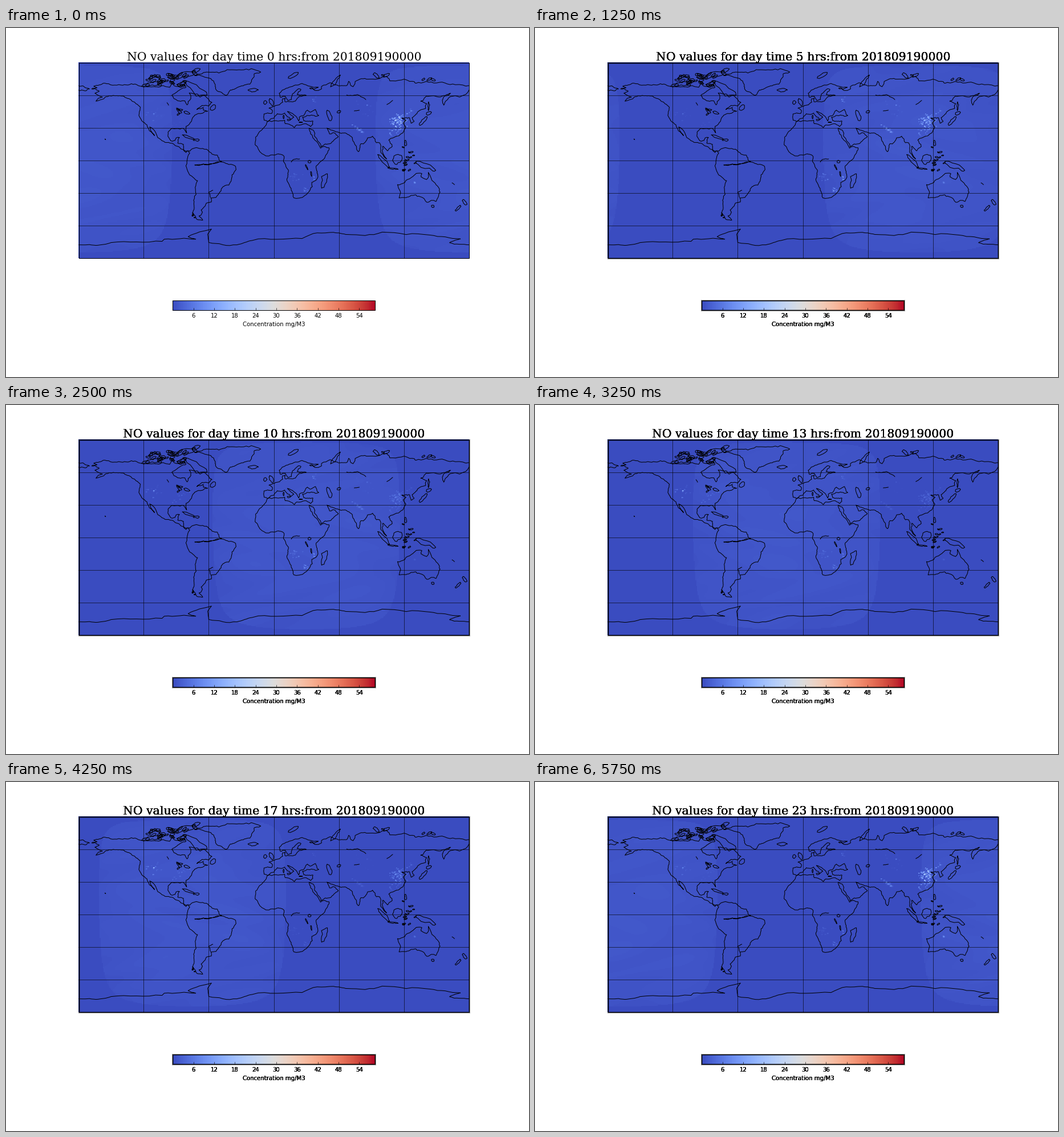
Write a matplotlib script that moves like this. It is 917x611 px and loops after 6000 ms.

```python
import numpy as np
import matplotlib.pyplot as plt
from matplotlib.animation import FuncAnimation
from matplotlib.collections import LineCollection
from matplotlib.patches import Rectangle

W, H, DPI = 917, 611, 64
PX = 72 / DPI                                # points per pixel
LEFT, RIGHT, TOP, BOTTOM = 127.25, 811.85, 61, 403.4
FRAME = (128, 812, 61, 403)
BAR = (292, 647, 477, 494)
VMAX = 58.7
FRAMES, STEP = 24, 250
rng = np.random.default_rng(7)

fig = plt.figure(figsize=(W / DPI, H / DPI), dpi=DPI, facecolor="white")
ax = fig.add_axes([0, 0, 1, 1])
ax.axis("off")


def to_px(lon, lat):
    return (LEFT + (lon + 180) * (RIGHT - LEFT) / 360,
            TOP + (90 - lat) * (BOTTOM - TOP) / 180)


# ---- coastlines: a few key points, roughened by midpoint displacement ----
lines = []


def coast(*flat, rough=0.08, levels=3):
    p = np.array(flat, float).reshape(-1, 2)
    for _ in range(levels):
        d = np.diff(p, axis=0)
        shift = rng.normal(0, rough, (len(d), 1))
        out = np.empty((2 * len(p) - 1, 2))
        out[::2] = p
        out[1::2] = p[:-1] + d / 2 + shift * np.c_[-d[:, 1], d[:, 0]]
        p = out
    lines.append(np.c_[to_px(p[:, 0], p[:, 1])])


def island(lon, lat, length, width, turn=0):
    """Ragged ellipse, its long axis turned anticlockwise from east."""
    a = np.linspace(0, 2 * np.pi, 9)
    r = rng.uniform(.8, 1.15, 9)
    r[-1] = r[0]
    x, y = r * np.cos(a) * length / 2, r * np.sin(a) * width / 2
    c, s = np.cos(np.radians(turn)), np.sin(np.radians(turn))
    coast(*np.c_[lon + c * x - s * y, lat + s * x + c * y].ravel(),
          rough=.12, levels=1)


def archipelago(n, west, east, south, north, size):
    for _ in range(n):
        length = size * rng.uniform(.5, 1.3)
        island(rng.uniform(west, east), rng.uniform(south, north),
               length, length * .4, rng.uniform(-40, 40))


# North America, clockwise from the Bering Strait
coast(-168,66, -163,67, -166,68.5, -156,71.3, -141,69.6, -128,70.5, -115,68,
      -108,68, -96,67.5, -94,71.5, -91,68.5, -86,67.5, -82,69.5, -81,67.5,
      -87,65, -94,60, -92,57, -82,55, -80,51.3, -79,54.5, -76.5,57, -78,62.3,
      -70,61, -68,58.5, -64.5,60.3, -57,53.5, -60,50.2, -71,47, -65,49,
      -65,46.5, -61,45.5, -66,43.5, -70.5,43, -74,40.5, -76,36, -81,31.5,
      -80.3,25.5, -83,29.5, -90,29.5, -95,29, -97.5,26, -97.5,22, -95,18.3,
      -91,18.6, -90,21, -87,21.3, -88.5,16, -83.3,15, -83,9.5, -77.5,8.6)
coast(-77.5,7, -79.5,9, -81,7.5, -86,11, -94,16, -105.5,20.3, -109,26,
      -114.5,31, -110,23, -115,28, -117,33, -122,37, -124.4,42, -123,49,
      -131,55, -139,59.5, -148,60, -153,59, -164,54.7, -158,58.5, -165,62,
      -161,64, -168,66)
# South America
coast(-77.5,7, -80,0, -81,-5, -76,-14, -70.3,-18.4, -71.6,-31, -73.7,-40,
      -75,-48, -71,-54, -65.5,-54.8, -69,-51, -65.8,-47.5, -67,-45.5, -64,-42.5,
      -62,-39, -57.5,-38, -58,-34.3, -53.5,-34, -48.7,-28, -48,-25.5, -41.5,-22.5,
      -39,-17, -38.5,-13, -35,-8.5, -35.5,-5, -44,-2.7, -50,0, -52,5,
      -57,6, -62,10.5, -71.5,12, -75,11, -77.5,8.6)
coast(-73,-4, -65,-3, -58,-3.3, -48,-1, -56,-2.8, -65,-3.3, -73,-4, rough=.05)
coast(-58.4,-34, -60,-29, -56,-27.3)
# Greenland
coast(-73,78.2, -58,75.5, -54,70, -52,64, -44,60, -40,65, -32,68, -22,70.4,
      -20,75, -18,80, -12,81.5, -30,83.5, -47,82, -62,81.5, -73,78.2)
# Africa
coast(32.5,30, 37,20, 43,11.5, 51,11.8, 47.5,4, 39,-5, 40.7,-15, 35,-20,
      35.5,-24, 32,-29, 26,-34, 18.5,-34.3, 14.5,-23, 12,-17, 13.5,-10,
      9,-1, 9.5,3.8, 4.5,6.2, -7.5,4.4, -13.3,9, -17.3,14.7, -16.5,22,
      -10,29.5, -6,35.8, 10,37.2, 10.5,34, 19,30.4, 22,32.7, 34,31.3)
# Atlantic Europe, Baltic, Scandinavia
coast(-5.6,36, -9,37.3, -9,43, -1.8,43.5, -1.2,46, -4.5,48.3, 1.7,50.8, 8.2,53.7,
      8.2,57, 10.5,57.5, 10.3,54.2, 20,54.8, 21.5,57.3, 23.5,59, 30,60, 21.5,60.8,
      25,65.5, 22,65.7, 17.3,61.5, 16.3,56.3, 13,55.5, 10.5,59.3, 6,58.3, 5,62,
      14,67.5, 26,71, 41,67.5, 33,66.7, 38,64.5, 44,66, 44,68.3, 60,68.7)
# Arctic coast of Asia
coast(60,68.7, 67,69, 69,73, 73,68, 75,72.8, 87,75, 104,77.7, 107,73.4,
      128,73, 131,71.2, 150,71.5, 170,70, 180,69)
coast(-180,69, -170,66, -173,64.3, -180,65)
# Asia, from the Bering Sea round to the Red Sea
coast(180,65, 178.5,62.5, 163,59, 156.7,51, 156,57.5, 163,62, 155,59.3, 143,59.3,
      135.5,54.7, 141,52.5, 140,48, 132,43.2, 127.5,39.5, 129.3,36, 126.5,34.5,
      125,39.5, 121.5,39.5, 118,39, 122,37, 119.3,35, 121.8,31, 119,25.5,
      110,21, 106,19, 109.2,13, 105,9, 100.5,13.3, 100,9, 104,1.5, 98.5,8,
      97.5,16.5, 94.5,16.5, 91,22.5, 86.5,21, 80.2,15.5, 78,8.2, 73,18,
      72.5,21, 67,25, 57,26.5, 49,30, 51.5,24.5, 56,25.5, 59.5,22, 52,15.6,
      43.5,12.8, 39,21, 35,28.5, 32.5,30)
# Mediterranean and Black Sea
coast(34,31.3, 36,36.5, 27.5,36.8, 26.5,40, 35,42, 41.5,41.5, 38.5,47, 34,44.7,
      31,46.5, 28,42, 23.5,40, 22.8,36.6, 19.5,41.5, 12.5,45.3, 18.4,40,
      16,38, 10,43.8, 3.2,43.2, 0,39, -5.6,36)
# Australia
coast(114,-22, 115.5,-34.3, 124,-33.5, 131,-31.5, 138,-34.5, 141,-38.3, 149.5,-37.6,
      153.3,-29, 150.5,-23, 146,-18.5, 142.5,-10.8, 140.8,-17.4, 135.7,-15,
      136.5,-12, 131,-12, 128,-14.8, 122,-18, 114,-22)
# Antarctica
coast(-180,-77.5, -164,-78, -150,-75.4, -103,-74.3, -101,-72.3, -72,-72.3, -79,-70,
      -57.5,-63, -61,-68, -60,-75.3, -34,-77.5, -20,-73.5, 26,-71.7, 55,-66,
      68,-68, 100,-65.8, 144,-68.5, 172,-72, 162,-75.5, 180,-77.5, rough=.03)

# centre lon, centre lat, length, width, turn
for shape in [
    (-73, 67, 24, 6, -30), (-80, 80, 27, 5, 20), (-110, 71, 16, 4, 10),   # Arctic
    (-56, 49, 6, 4, 40), (-79, 21.7, 11, 2, -20), (-71.3, 19, 6, 1.6, 0),
    (-2.4, 54, 8.5, 3.5, 115), (-8, 53.4, 4, 3, 50), (-18.8, 65, 9, 2.8, 0),
    (18, 78.5, 11, 3, 30), (57, 73.5, 13, 2.5, 50),
    (14, 37.5, 3, 1.2, 0), (9, 40.2, 3, 1.2, 90), (25, 35.3, 3, .6, 0),
    (46.7, -18.8, 14, 4.5, 68), (33, -1, 3, 2.4, 0), (30.2, -6, 5.5, .7, 115),
    (34.5, -12, 4.6, .7, 100), (51, 41.5, 11, 4, 110), (60, 45, 3.6, 2.4, 20),
    (137.5, 36.5, 12, 2.5, 45), (143, 43.5, 5, 3, 20), (142.7, 50, 8, 1.3, 90),
    (121.5, 16, 5, 2, 100), (114, 1, 10, 8, 45), (101, 0, 15, 3.5, -47),
    (110, -7.4, 9, 1.2, -8), (121, -2, 7, 1.3, 80), (140.5, -5, 22, 5, -24),
    (176, -38.5, 6.5, 3, 120), (170, -43.8, 8, 2, 45), (146.6, -42, 3, 2.5, 0),
]:
    island(*shape)

archipelago(26, -122, -80, 69, 79, 6)        # Arctic Canada
archipelago(8, -100, -72, 77, 82, 6)
archipelago(5, -91, -77, 42, 47.5, 4.5)      # Great Lakes
archipelago(10, 119, 131, -4, 13, 2.5)       # Philippines, Moluccas
archipelago(4, 116, 126, -9.5, -8.2, 3)
archipelago(3, 137, 149, 74, 75.5, 6)
archipelago(3, 94, 104, 78.3, 80, 6)
archipelago(5, -75, -72.5, -54, -47, 2)      # Patagonia
coast(-98.5,53.5, -97,50.8)
coast(-155.8,20, -155,19.3, -155.8,20)
coast(67,60.5, 77,60.8, 85,56)
coast(74,45.7, 79,46.5)
coast(104,51.6, 109.8,55.5)
coast(16,-1.5, 18,1, 24,1.5)
coast(164.2,-20.3, 166.8,-22.2)

# ---- concentration field ----
NX, NY = 480, 240
lon, lat = np.meshgrid((np.arange(NX) + .5) * 360 / NX - 180,
                       90 - (np.arange(NY) + .5) * 180 / NY)


def cluster(x, y, spread, tilt, count, peak):
    layer = np.zeros((NY, NX))
    for dx, dy, r in zip(rng.normal(0, spread, count),
                         rng.normal(0, spread, count), rng.random(count)):
        if tilt:
            dy = dy * .3 + tilt * dx
        i = int((90 - y - dy) * NY / 180)
        j = int((x + dx + 180) * NX / 360)
        v = peak * (.25 + .75 * r * r)
        layer[i, j] += v
        layer[i, j + 1] += v * .6
        layer[i + 1, j] += v * .25
    return layer, x


# lon, lat, spread, tilt, count, peak
layers = [cluster(*c) for c in [
    (114, 35.5, 3.4, 0, 65, 20),
    (111.6, 27, 3.5, 0, 16, 11),
    (79, 27.5, 4, -.75, 20, 11),
    (123, 43, 3, .6, 10, 8),
    (81, 51, 7, 0, 12, 4),
    (38, 56, 1.5, 0, 5, 8),
    (28.6, -27.5, 1.3, 0, 8, 14),
    (20.5, -14.5, 2.5, 0, 12, 7),
    (37.5, -15.5, 1, 0, 4, 9),
    (-86, 38, 4, .5, 14, 5),
    (-110, 42, 3.5, 0, 12, 7),
    (-110.8, 43, .2, 0, 2, 34),
    (129, -19.5, .8, 0, 3, 12),
]]

waves = sum(np.sin(np.radians(k * lon) + k * np.sin(np.radians(3 * lat))
                   + (-1) ** k * lat / (4 + k) + k) for k in range(2, 6))
SIN_D, COS_D = np.sin(np.radians(1.4)), np.cos(np.radians(1.4))


def strength(hour, x):
    """Emissions peak at eight in the morning, local time."""
    return .6 + .4 * np.cos(np.pi / 12 * (hour + x / 15 - 8))


def field(hour):
    turn = np.radians(lon - (180 - 15 * hour))
    height = (np.sin(np.radians(lat)) * SIN_D
              + np.cos(np.radians(lat)) * COS_D * np.cos(turn))
    sun = np.sqrt(np.clip(height, 0, 1))
    day = np.where(height > .07, .6 + .85 * sun + .08 * waves, 0)
    return .1 + day + sum(a * strength(hour, x) for a, x in layers)


# ---- figure ----
def picture(data, x0, x1, y0, y1, vmax):
    return ax.imshow(data, cmap="coolwarm", vmin=0, vmax=vmax, aspect="auto",
                     extent=(x0, x1, y1, y0), interpolation="nearest")


image = picture(field(0), LEFT, RIGHT, TOP, BOTTOM, VMAX)
picture(np.linspace(0, 1, 256)[None], *BAR, 1)
ax.set_xlim(0, W)
ax.set_ylim(H, 0)

ax.add_collection(LineCollection(lines, colors="black", linewidths=PX,
                                 joinstyle="round", zorder=3))
for k in range(-120, 180, 60):
    x, _ = to_px(k, 0)
    ax.plot([x, x], [TOP, BOTTOM], color="black", lw=PX, alpha=.6)
for k in range(-60, 90, 30):
    _, y = to_px(0, k)
    ax.plot([LEFT, RIGHT], [y, y], color="black", lw=PX, alpha=.6)

heavy = []                                   # shown after the first step


def box(x0, x1, y0, y1):
    for lw, alpha in ((1, 1), (3, .4)):
        r = Rectangle((x0, y0), x1 - x0, y1 - y0, fill=False, lw=lw * PX,
                      ec="black", alpha=alpha, zorder=4)
        ax.add_patch(r)
        if lw > 1:
            heavy.append(r)


def label(x, y, text, size, family):
    copies = [ax.text(x, y, text, fontsize=size * PX, family=family,
                      color="black", ha="center", va="baseline")
              for _ in range(4)]
    heavy.extend(copies[1:])
    return copies


box(*FRAME)
box(*BAR)
for v in range(6, 55, 6):
    x = 292.2 + 355.5 * v / VMAX
    ax.plot([x, x], [BAR[3], BAR[3] - 4], color="black", lw=.6 * PX)
    label(x, 507, str(v), 10.15, "DejaVu Sans")
label(470, 522, "Concentration mg/M3", 10.15, "DejaVu Sans")
titles = label(470, 57, "", 20.4, "DejaVu Serif")


def draw(k):
    image.set_data(field(k))
    for t in titles:
        t.set_text(f"NO values for day time {k} hrs:from 201809190000")
    for a in heavy:
        a.set_visible(k > 0)
    return [image, *titles, *heavy]


anim = FuncAnimation(fig, draw, frames=FRAMES, interval=STEP, repeat=True,
                     repeat_delay=0, blit=False)
plt.show()
```
